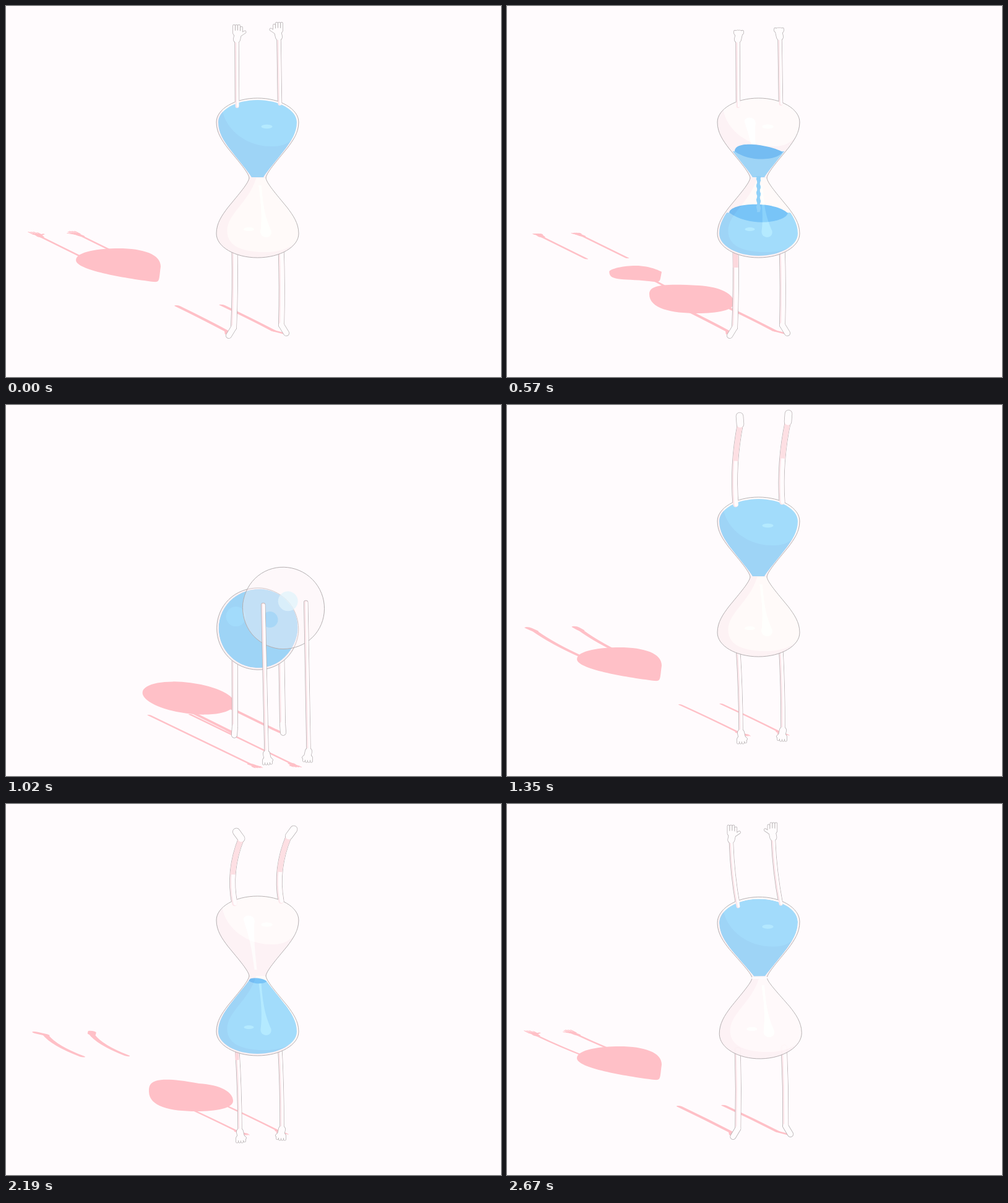
An HTML page with a canvas that plays this animation: 800 by 600 pixels, repeating every 2.7 s.

```html
<!DOCTYPE html>
<html lang="en">
<head>
<meta charset="utf-8">
<title>Hourglass</title>
<style>
html, body { margin: 0; width: 100%; height: 100%; overflow: hidden; background: #fffbfd; }
canvas { display: block; width: 800px; height: 600px; }
</style>
</head>
<body>
<canvas id="stage" width="800" height="600"></canvas>
<script>
const g = document.getElementById('stage').getContext('2d');
const LOOP = 2700, HALF = 1350, FLIP_AT = 850, FLIP_MS = 490;
const CX = 406.5, LOW = 368, SPAN = 180;
const LINE = '#b4afb1', SKIN = '#fffcfd', TINT = '#fde7eb', SHADE = '#ffc0c7';

// time, ankle x, y, bend, toe dx, dy
const LEG = [
  [0, 368, 520, 2, -8, 13], [850, 368, 520, 2, -8, 13], [1020, 370, 520, 0, -1, 14],
  [1055, 370, 510, 0, -1, 14], [1110, 368, 420, 0, 0, 12], [1200, 372, 140, -4, 0, -8],
  [1330, 377, 31, -9, -1, -13], [1450, 377, 31, -9, -1, -13], [1740, 377, 33, -9, -8, -14],
  [2190, 380, 54, -16, -8, -11], [2280, 396, 220, 0, -2, 0], [2370, 424, 570, 0, -5, 14],
  [2400, 422, 570, 0, -6, 14], [2700, 368, 520, 2, -8, 13]
];
// time, wrist x, y, bend
const ARM = [
  [0, 373, 58, 0], [850, 373, 58, 0], [930, 388, 200, 0], [1020, 421, 560, 0],
  [1050, 421, 562, 0], [1330, 378, 526, 2], [2370, 378, 526, 2], [2400, 378, 520, 0],
  [2460, 374, 430, 0], [2550, 366, 160, 0], [2670, 362, 62, -4], [2700, 373, 58, 0]
];
// time, open fingers
const GRIP = [[0, 1], [250, 1], [420, 0], [700, 0], [850, 1], [2700, 1]];
// drain time, left x, left y, reach x, reach y, top x, top y
const POOL = [
  [165, 262, 486, 275, 478, 310, 476], [390, 238, 476, 262, 456, 302, 456],
  [570, 230, 466, 245, 448, 310, 452], [780, 230, 466, 238, 444, 311, 452],
  [840, 231, 465, 232, 437, 312, 452]
];
// drain time, left x, left y, top y, right y
const CONE = [
  [0, 113, 411, 392, 421], [390, 134, 421, 406, 420],
  [570, 165, 430, 420, 430], [820, 236, 445, 442, 444]
];

const lerp = (a, b, k) => a + (b - a) * k;
const clamp = (v, a, b) => Math.min(b, Math.max(a, v));

function sample(rows, t) {
  let i = 1;
  while (i < rows.length - 1 && rows[i][0] < t) i++;
  const a = rows[i - 1], b = rows[i];
  const k = clamp((t - a[0]) / (b[0] - a[0]), 0, 1);
  return a.slice(1).map((v, n) => lerp(v, b[n + 1], k));
}

function seg(x1, y1, x2, y2, w) {
  g.lineWidth = w;
  g.beginPath();
  g.moveTo(x1, y1);
  g.lineTo(x2, y2);
  g.stroke();
}

function dot(x, y, rx, ry, color) {
  g.fillStyle = color;
  g.beginPath();
  g.ellipse(x, y, rx, ry, 0, 0, 7);
  g.fill();
}

/* ---------- limbs ---------- */

function limbs(t, kind, bulb, c) {
  const isLeg = kind === 'leg';
  const [x, y, bend, tx, ty] = sample(isLeg ? LEG : ARM, t);
  return [0, 1].map(right => {
    const bx = bulb.x + (right ? (isLeg ? 38 : 36) : (isLeg ? -37 : -33));
    const by = bulb.y + (isLeg ? 27 : -26) * c - (right ? 4 : 0);
    const ex = x + right * (isLeg ? 77 : 68), ey = y - right * 4;
    const up = clamp((by - ey) / 60, -1, 1);
    return {
      isLeg, bx, by, ex, ey, up, side: right ? -1 : 1,
      mx: (bx + ex) / 2 + bend, my: (by + ey) / 2,
      tx: ex + (right ? -tx : tx), ty: ey + ty,
      w: isLeg ? 8.4 : 5.8,
      foot: up > 0 ? 11 : 8.5,
      grip: up > 0 ? sample(GRIP, t)[0] : 0.35
    };
  });
}

function bone(l, w) {
  g.lineWidth = w;
  g.beginPath();
  g.moveTo(l.ex, l.ey);
  g.quadraticCurveTo(l.mx, l.my, l.bx, l.by);
  g.stroke();
}

function tip(l, grow) {
  if (l.isLeg) return seg(l.ex, l.ey, l.tx, l.ty, l.foot + grow);
  const at = (x, y) => [l.ex + x * l.side, l.ey - y * l.up];
  seg(...at(0, 4), ...at(1.5, 11), 10.5 + grow);
  seg(...at(-1, 14), ...at(3, 14), 9 + grow);
  for (let i = 0; i < 4; i++) {
    const x = -4.5 + i * 4;
    seg(...at(x, 14), ...at(x, 17 + l.grip * (i === 3 ? 6 : 9)), 3 + grow);
  }
  seg(...at(4, 10), ...at(6 + 7 * l.grip, 13 + 3 * l.grip), 3.4 + grow);
}

function outline(l) {
  g.strokeStyle = LINE;
  bone(l, l.w + 1.5);
  tip(l, 1.5);
}

function core(l) {
  g.strokeStyle = TINT;
  bone(l, l.w);
  g.strokeStyle = SKIN;
  g.save();
  g.translate(1.1, 0);
  bone(l, l.w - 2.4);
  g.restore();
  if (l.isLeg && l.up > 0.5) {
    g.save();
    g.lineCap = 'butt';
    g.strokeStyle = '#fddfe3';
    g.setLineDash([60, 999]);
    bone(l, l.w);
    g.restore();
  }
  g.strokeStyle = SKIN;
  tip(l, 0);
}

function limbShadow(l, q) {
  g.save();
  g.transform(1, 0, 0.66, 0.33, -353 - 45 * q, 355 + 41 * q);
  g.strokeStyle = SHADE;
  bone(l, l.w);
  tip(l, 0);
  g.restore();
}

/* ---------- glass ---------- */

// One bulb with its neck toward +y; s turns it to face the viewer.
function bulbPath(s, inset) {
  const w = 66.5 - inset, f = w / 66.5, cap = 39 + 27 * s - inset;
  const p = (x0, y0, x1, y1) => [lerp(x0, x1, s) * f, lerp(y0, y1, s)];
  const a = p(66.5, 17, 66.5, 17.5), b = p(57, 30, 59, 34.5), m = p(48, 42, 47, 47);
  const d = p(30, 64, 34.5, 59), e = p(14, 82, 17.5, 66), n = p(13.5, 90, 0, 66);
  if (inset) { n[0] *= 0.75; n[1] -= 1; }
  const neg = q => [-q[0], q[1]];
  g.beginPath();
  g.moveTo(...n);
  g.bezierCurveTo(...e, ...d, ...m);
  g.bezierCurveTo(...b, ...a, w, 0);
  g.bezierCurveTo(w, -0.55 * cap, 0.55 * w, -cap, 0, -cap);
  g.bezierCurveTo(-0.55 * w, -cap, -w, -0.55 * cap, -w, 0);
  g.bezierCurveTo(...neg(a), ...neg(b), ...neg(m));
  g.bezierCurveTo(...neg(d), ...neg(e), ...neg(n));
}

function place(b, inset) {
  g.save();
  g.translate(b.x, b.y);
  g.rotate(b.turn);
  bulbPath(b.s, inset);
  g.restore();
}

const halfWidth = d => d < 0 ? 63 * Math.sqrt(Math.max(0, 1 - d * d / 1296)) : Math.min(63, 70 - 0.67 * d);

function water(level, hw, bottom, k) {
  const ry = hw * 0.38;
  g.fillStyle = '#9ed4f6';
  g.fillRect(CX - 70, level, 140, bottom - level);
  g.fillStyle = '#74bcf2';
  g.beginPath();
  g.moveTo(CX - hw, level);
  g.bezierCurveTo(CX - hw, level - ry * (1 - k), CX + hw * 0.5, level - ry * (1 + k), CX + hw, level + 1);
  g.bezierCurveTo(CX + hw * 0.9, level + ry * 0.9, CX - hw * 0.3, level + ry * 1.35, CX - hw, level);
  g.fill();
}

function lights(b, top) {
  g.globalCompositeOperation = 'lighter';
  g.globalAlpha = 1 - b.s;
  g.fillStyle = 'rgb(4,8,5)';
  g.translate(b.x, b.y);
  g.beginPath();
  if (top) {
    g.moveTo(-57, -20);
    g.bezierCurveTo(-50, 15, -15, 40, 25, 39);
    g.bezierCurveTo(42, 39, 52, 33, 64, 20);
    g.lineTo(70, -50);
    g.lineTo(-57, -50);
  } else {
    g.moveTo(-2, -90);
    g.bezierCurveTo(-14, -50, -49, -32, -49, -4);
    g.bezierCurveTo(-49, 22, -20, 30, 10, 30);
    g.bezierCurveTo(40, 30, 55, 22, 66, 10);
    g.lineTo(70, -90);
  }
  g.fill();
  const glow = 'rgb(18,14,4)';
  if (top) {
    dot(15, 7, 9, 3.3, glow);
  } else {
    g.fillStyle = glow;
    g.beginPath();
    g.moveTo(2, -78);
    g.lineTo(6, -78);
    g.bezierCurveTo(9, -40, 13, -25, 22, -4);
    g.bezierCurveTo(24, 9, 5, 9, 5, -3);
    g.bezierCurveTo(8, -25, 6, -50, 2, -78);
    g.fill();
    dot(-14, -7, 8, 3, glow);
  }
}

function streak(b) {
  g.fillStyle = 'rgba(255,255,255,.75)';
  g.beginPath();
  g.moveTo(b.x - 22, b.y);
  g.bezierCurveTo(b.x - 24, b.y - 10, b.x - 4, b.y - 10, b.x - 5, b.y + 2);
  g.bezierCurveTo(b.x - 7, b.y + 20, b.x - 4, b.y + 50, b.x - 1, b.y + 80);
  g.lineTo(b.x - 5, b.y + 80);
  g.bezierCurveTo(b.x - 9, b.y + 45, b.x - 14, b.y + 25, b.x - 22, b.y);
  g.fill();
}

function drawBulb(b, front, top, u) {
  const { s } = b, draining = u < FLIP_AT;
  place(b, 0);
  g.fillStyle = front ? `rgba(253,242,245,${1 - 0.62 * s})` : '#fdf2f4';
  g.fill();
  g.strokeStyle = LINE;
  g.lineWidth = 1;
  g.stroke();

  g.save();
  place(b, 0);
  g.clip();
  if (top && draining && u > 30) streak(b);
  g.save();
  place(b, 3);
  g.clip();
  const k = (1 - u / FLIP_AT) * Math.cos((u - 390) / 400 * 2 * Math.PI);
  if (draining) {
    const yTop = 159 + 0.133 * u, yLow = 437 - 0.18 * u;
    if (top && u < 30) {
      g.fillStyle = '#9ed4f6';
      g.fillRect(300, 100, 220, 178);
    } else if (top && u < 825) {
      water(yTop, halfWidth(yTop - 188), 278, k);
    } else if (!top && yLow < 404) {
      water(yLow, halfWidth(LOW - yLow), 410, -0.5 * k);
    }
  } else if (!front) {
    g.fillStyle = '#9ed4f6';
    g.fill();
  }
  g.restore();
  g.save();
  lights(b, top);
  g.restore();
  g.restore();

  if (s > 0.3) {
    g.save();
    g.globalAlpha = (s - 0.3) / 0.7;
    if (front) {
      dot(b.x + 7, b.y - 11, 16, 16, 'rgba(225,245,253,.75)');
    } else {
      dot(b.x - 35, b.y - 20, 16, 16, '#a2dcfb');
      dot(b.x + 20, b.y - 15, 13, 13, '#70c5f7');
    }
    g.restore();
  }
}

function stream(u) {
  if (u < 30 || u > 810) return;
  const end = Math.min(277 + 0.75 * u, 436 - 0.18 * u, 402);
  g.fillStyle = '#8fd0f8';
  g.beginPath();
  const edge = (y, side) => CX + side * 2.9 + 0.8 * Math.sin(y * 0.55 - u * 0.05 + side);
  g.moveTo(CX - 4, 275);
  for (let y = 277; y < end; y += 3) g.lineTo(edge(y, -1), y);
  g.lineTo(edge(end, -1), end);
  g.lineTo(edge(end, 1), end);
  for (let y = end; y > 277; y -= 3) g.lineTo(edge(y, 1), y);
  g.lineTo(CX + 4, 275);
  g.fill();
}

/* ---------- water shadows ---------- */

function coneShadow(u) {
  const [L, y, top, r] = sample(CONE, u), m = (L + 250) / 2;
  g.beginPath();
  g.moveTo(238, 446);
  g.bezierCurveTo(190, 440, L, y + 16, L, y);
  g.bezierCurveTo(L, top + 5, m - 30 * (250 - L) / 137, top, m, top);
  g.bezierCurveTo(lerp(m, 250, 0.6), top, 250, top + 10, 250, r);
  g.bezierCurveTo(247, 444, 249, 447, 238, 446);
  g.fill();
}

function poolShadow(u) {
  const [L, y, cx, cy, mx, my] = sample(POOL, u);
  g.beginPath();
  g.moveTo(367, 480);
  g.bezierCurveTo(367, 492, 340, 497, 308, 497);
  g.bezierCurveTo(265, 497, L, 489, L, y);
  g.bezierCurveTo(L, y - 13, cx, cy, mx, my);
  g.bezierCurveTo(mx + 35, my + 2, 367, 466, 367, 480);
  g.fill();
}

function waterShadow(u, rear) {
  g.fillStyle = g.strokeStyle = SHADE;
  if (u < FLIP_AT) {
    if (u < 820) coneShadow(u);
    if (u > 165) poolShadow(u);
    if (u > 30 && u < 810) seg(238, 444, 268, 460, 3);
    return;
  }
  const lift = clamp((LOW - 6 - rear.y) / 174, 0, 1);
  if (lift > 0.93) return coneShadow(0);
  g.beginPath();
  g.ellipse(295 - 114 * lift, 474 - 55 * lift, 75 - 6 * lift, 25, 0.13, 0, 7);
  g.fill();
}

/* ---------- scene ---------- */

function draw(t) {
  const u = t % HALF, second = t >= HALF;
  const p = clamp((u - FLIP_AT) / FLIP_MS, 0, 1);
  const turn = p < 1 ? Math.PI * p * (1.4 - 0.4 * p) : Math.PI;
  const c = Math.cos(turn), s = Math.abs(Math.sin(turn)) < 1e-6 ? 0 : Math.sin(turn);
  const ground = LOW - 6 * s + 45 * s * Math.max(-c, 0);
  const front = { s, x: CX + 43 * s, y: ground - SPAN * Math.max(c, 0) };
  const rear = { s, x: CX, y: ground + SPAN * Math.min(c, 0) };
  const dir = Math.atan2(front.y - rear.y, front.x - rear.x);
  rear.turn = dir - Math.PI / 2;
  front.turn = dir + Math.PI / 2;

  const way = second ? -c : c;
  const legs = limbs(t, 'leg', second ? front : rear, way);
  const arms = limbs(t, 'arm', second ? rear : front, way);
  const near = second ? legs : arms, far = second ? arms : legs;

  g.fillStyle = '#fffbfd';
  g.fillRect(0, 0, 800, 600);
  g.lineCap = g.lineJoin = 'round';

  near.forEach(l => limbShadow(l, s));
  far.forEach(l => limbShadow(l, 0));
  waterShadow(u, rear);

  const flat = s < 0.5;
  const over = flat && c < 0 ? far : near, under = over === near ? far : near;
  under.forEach(l => { outline(l); core(l); });
  if (u > 200 && c > 0) {
    const l = under[0];
    g.fillStyle = '#fcd8dd';
    g.fillRect(l.bx - l.w / 2, l.by, l.w, second ? 20 : 28);
  }
  if (flat) over.forEach(outline);

  drawBulb(rear, false, c < 0, u);
  drawBulb(front, true, c >= 0, u);
  if (u < FLIP_AT) stream(u);

  if (!flat) over.forEach(outline);
  over.forEach(core);
}

const start = performance.now();
function tick() {
  draw((performance.now() - start) % LOOP);
  requestAnimationFrame(tick);
}
tick();
</script>
</body>
</html>
```
